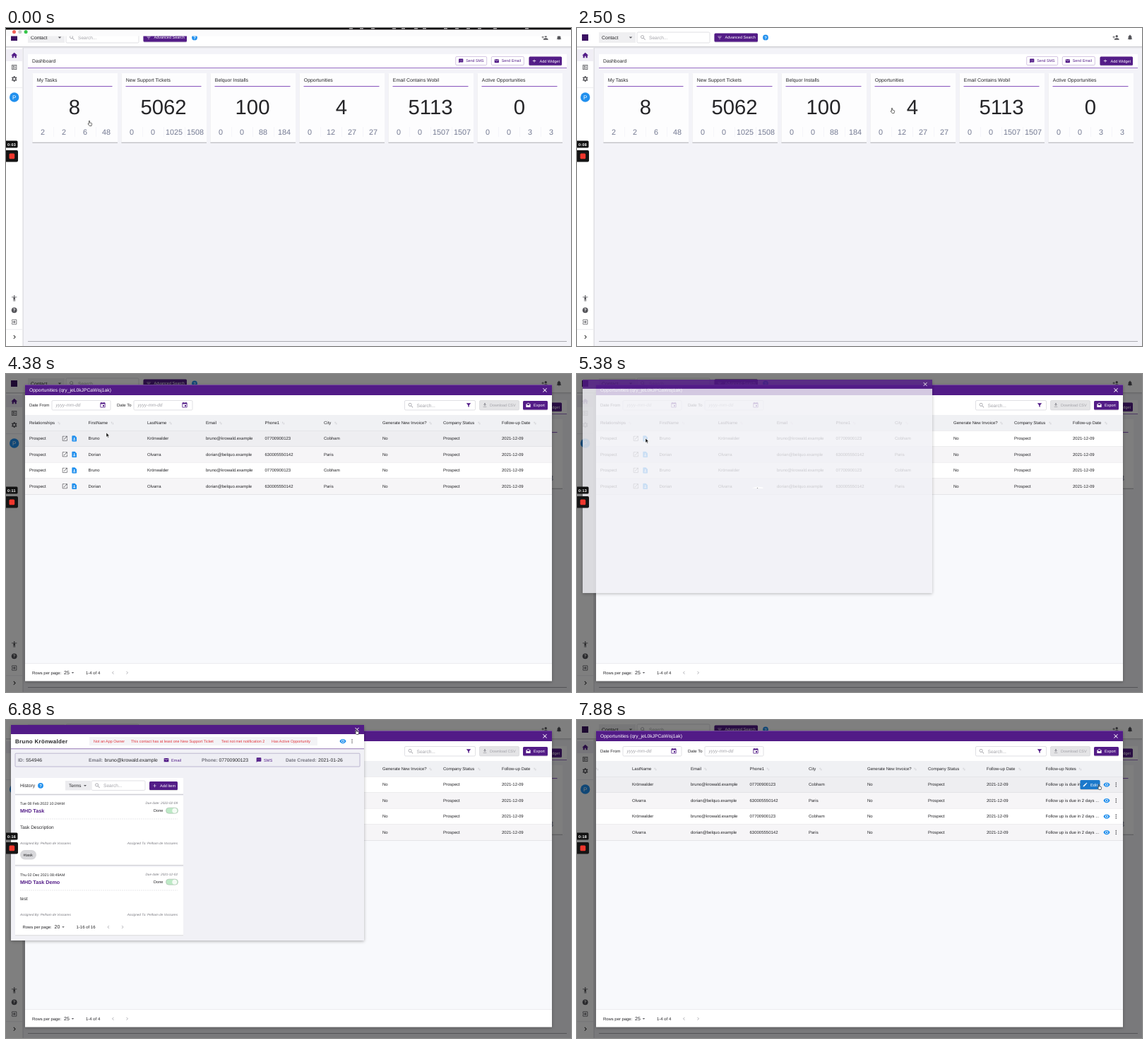
An HTML page for the animation above (8 s loop, 800x450 px).

```html
<!DOCTYPE html>
<html lang="en">
<head>
<meta charset="utf-8">
<title>Dashboard walkthrough</title>
<style>
html, body { margin: 0; width: 100%; height: 100%; overflow: hidden; background: #f3f3f7; }
svg { display: block; width: 100%; height: 100%; }
text { font-family: "Liberation Sans", Arial, sans-serif; text-rendering: geometricPrecision; white-space: pre; }
</style>
</head>
<body>
<svg id="stage" viewBox="0 0 800 450"></svg>
<script>
const LOOP = 8000, STEP = 125;
const PURPLE = '#521b87', BLUE = '#2190ee', INK = '#252528', GREY = '#a2a2a8', LINE = '#d3d3d8';

const ICONS = {
  home: 'M10 20v-6h4v6h5v-8h3L12 3 2 12h3v8z',
  list: 'M3 3h18v18H3zM5 5v14h14V5zM7 7h5v5H7zm7 0h3v2h-3zm0 4h3v2h-3zm-7 3h5v3H7zm7 1h3v2h-3z',
  gear: 'M10 2h4l.5 3 2 1 3-1 2 3.5-2.5 2v3l2.5 2-2 3.5-3-1-2 1-.5 3h-4l-.5-3-2-1-3 1-2-3.5 2.5-2v-3l-2.5-2 2-3.5 3 1 2-1zM12 8a4 4 0 1 0 0 8 4 4 0 0 0 0-8z',
  person: 'M12 2a2 2 0 1 1 0 4 2 2 0 0 1 0-4zm9 7h-6v13h-2v-6h-2v6H9V9H3V7h18z',
  exit: 'M10.1 15.6L11.5 17l5-5-5-5-1.4 1.4 2.6 2.6H3v2h9.7zM19 3H5a2 2 0 0 0-2 2v4h2V5h14v14H5v-4H3v4a2 2 0 0 0 2 2h14a2 2 0 0 0 2-2V5a2 2 0 0 0-2-2z',
  next: 'M8.6 16.6L13.2 12 8.6 7.4 10 6l6 6-6 6z',
  prev: 'M15.4 7.4L10.8 12l4.6 4.6L14 18l-6-6 6-6z',
  drop: 'M6 9l6 6 6-6z',
  search: 'M9.5 3a6.5 6.5 0 0 1 5.2 10.4L21 19.5 19.5 21l-6.1-6.3A6.5 6.5 0 1 1 9.5 3zm0 2a4.5 4.5 0 1 0 0 9 4.5 4.5 0 0 0 0-9z',
  lines: 'M10 18h4v-2h-4zM3 6v2h18V6zm3 7h12v-2H6z',
  funnel: 'M3 4h18l-7 9v7l-4-2v-5z',
  addPerson: 'M15 4a4 4 0 1 1 0 8 4 4 0 0 1 0-8zM6 10V7H4v3H1v2h3v3h2v-3h3v-2zm9 4c-2.7 0-8 1.3-8 4v2h16v-2c0-2.7-5.3-4-8-4z',
  bell: 'M10 20h4a2 2 0 0 1-4 0zm8-4v-5c0-3-1.6-5.6-4.5-6.3V4a1.5 1.5 0 0 0-3 0v.7C7.6 5.4 6 8 6 11v5l-2 2v1h16v-1z',
  sms: 'M4 2h16a2 2 0 0 1 2 2v12a2 2 0 0 1-2 2H6l-4 4V4a2 2 0 0 1 2-2zm3 7v2h2V9zm4 0v2h2V9zm4 0v2h2V9z',
  mail: 'M4 4h16a2 2 0 0 1 2 2v12a2 2 0 0 1-2 2H4a2 2 0 0 1-2-2V6a2 2 0 0 1 2-2zm16 4V6l-8 5-8-5v2l8 5z',
  draft: 'M12 1l10 6v12a2 2 0 0 1-2 2H4a2 2 0 0 1-2-2V7zM4 8l8 5 8-5-8-5z',
  plus: 'M11 5h2v6h6v2h-6v6h-2v-6H5v-2h6z',
  close: 'M19 6.4L17.6 5 12 10.6 6.4 5 5 6.4 10.6 12 5 17.6 6.4 19 12 13.4 17.6 19 19 17.6 13.4 12z',
  calendar: 'M17 12h-5v5h5zM16 1v2H8V1H6v2H5a2 2 0 0 0-2 2v14a2 2 0 0 0 2 2h14a2 2 0 0 0 2-2V5a2 2 0 0 0-2-2h-1V1zm3 18H5V8h14z',
  download: 'M19 9h-4V3H9v6H5l7 7zM5 18v2h14v-2z',
  open: 'M19 19H5V5h7V3H5a2 2 0 0 0-2 2v14a2 2 0 0 0 2 2h14a2 2 0 0 0 2-2v-7h-2zM14 3v2h3.6l-9.8 9.8 1.4 1.4L19 6.4V10h2V3z',
  card: 'M14 2H6a2 2 0 0 0-2 2v16a2 2 0 0 0 2 2h12a2 2 0 0 0 2-2V8zM12 9a2.2 2.2 0 1 1 0 4.4A2.2 2.2 0 0 1 12 9zm4 9H8c0-2 2-3 4-3s4 1 4 3z',
  eye: 'M12 4.5C7 4.5 2.7 7.6 1 12c1.7 4.4 6 7.5 11 7.5s9.3-3.1 11-7.5c-1.7-4.4-6-7.5-11-7.5zM12 7a5 5 0 1 1 0 10 5 5 0 0 1 0-10zm0 2a3 3 0 1 0 0 6 3 3 0 0 0 0-6z',
  dots: 'M12 4a2 2 0 1 1 0 4 2 2 0 0 1 0-4zm0 6a2 2 0 1 1 0 4 2 2 0 0 1 0-4zm0 6a2 2 0 1 1 0 4 2 2 0 0 1 0-4z',
  pencil: 'M3 17.2V21h3.8L17.8 9.9l-3.7-3.7zM20.7 7a1 1 0 0 0 0-1.4l-2.3-2.3a1 1 0 0 0-1.4 0l-1.9 1.8 3.8 3.8z',
  sort: 'M8 3l4 5H9v8H7V8H4zM16 21l-4-5h3V8h2v8h3z'
};

const text = (x, y, s, size = 6, fill = INK, more = '') =>
  `<text x="${x}" y="${y}" font-size="${size}" fill="${fill}" ${more}>${s}</text>`;
const box = (x, y, w, h, fill, more = '') =>
  `<rect x="${x}" y="${y}" width="${w}" height="${h}" fill="${fill}" ${more}/>`;
const icon = (name, cx, cy, size, fill = '#55555a') =>
  `<path fill="${fill}" fill-rule="evenodd" transform="translate(${cx - size / 2} ${cy - size / 2}) scale(${size / 24})" d="${ICONS[name]}"/>`;
const field = (x, y, w, h, stroke = LINE) => box(x, y, w, h, '#fff', `rx="1.5" stroke="${stroke}" stroke-width=".7"`);
const group = (id, body, more = '') => `<g id="${id}" ${more}>${body}</g>`;
const help = (x, y, fill = BLUE) => `<circle cx="${x}" cy="${y}" r="3.9" fill="${fill}"/>` +
  text(x, y + 2.1, '?', 6, '#fff', 'text-anchor="middle" font-weight="bold"');
const button = (x, y, w, h, name, label) => box(x, y, w, h, PURPLE, 'rx="1.5" filter="url(#soft)"') +
  icon(name, x + 7.5, y + h / 2, 7.5, '#fff') + text(x + 15, y + h / 2 + 1.9, label, 5.5, '#fff');
const outlined = (x, w, name, label) => field(x, 40.5, w, 12, '#c3aed8') +
  icon(name, x + 7.5, 46.7, 7.5, PURPLE) + text(x + 14.5, 48.4, label, 5.3, PURPLE);
const searchBox = (x, y, w, h) => field(x, y, w, h) + icon('search', x + 8.5, y + h / 2, 9, GREY) +
  text(x + 17, y + h / 2 + 2.3, 'Search...', 6.6, GREY);
const pager = (x, y, size, range, arrows) => text(x, y, 'Rows per page:', 5.9) + text(x + 45, y + .4, size, 7) +
  icon('drop', x + 57.5, y - 2, 7) + range +
  icon('prev', arrows, y - 2, 9, '#b5b5ba') + icon('next', arrows + 20, y - 2, 9, '#b5b5ba');

function page() {
  const cards = [
    ['My Tasks', 8, [2, 2, 6, 48]], ['New Support Tickets', 5062, [0, 0, 1025, 1508]],
    ['Belquor Installs', 100, [0, 0, 88, 184]], ['Opportunities', 4, [0, 12, 27, 27]],
    ['Email Contains Wobil', 5113, [0, 0, 1507, 1507]], ['Active Opportunities', 0, [0, 0, 3, 3]]
  ].map(([title, total, parts], i) => {
    const x = 37.5 + i * 126;
    return box(x, 64, 120.5, 98, '#fdfdfe', 'filter="url(#soft)"') + box(x, 161.7, 120.5, .8, '#b3b3ba') +
      text(x + 6.3, 76.2, title, 6.9) + box(x + 6, 82, 107, 1.1, '#8d5cbf') +
      text(x + 59.5, 121.6, total, 29.3, INK, 'text-anchor="middle"') +
      parts.map((n, k) => text(x + 14.5 + k * 30, 151, n, 10.8, '#727891', 'text-anchor="middle"') +
        (k ? box(x + k * 30 - .5, 140, .6, 14, '#f1f1f5') : '')).join('');
  }).join('');
  const header = box(0, 0, 800, 26, '#fff') + box(0, 26, 800, 1, '#cfcfd3') + box(0, 27, 800, 1.5, '#e3e3e7') +
    box(7, 9, 9, 9, '#3b1263') +
    box(31, 6, 52, 15, '#efeff1') + text(35, 15.9, 'Contact', 6.8) + icon('drop', 76, 13.5, 9) +
    searchBox(85, 6, 103, 15) + button(194.5, 7.5, 61.5, 12, 'lines', 'Advanced Search') + help(267, 13.4) +
    icon('addPerson', 763, 13.3, 10) + icon('bell', 783, 13.3, 9.5);
  const side = box(0, 28, 24, 422, '#fff') + box(23.5, 28, 1.2, 422, '#d9d9de') + box(0, 30, 23, 17, '#f0eef5') +
    icon('home', 11.7, 38.8, 10.5, PURPLE) + icon('list', 11.7, 55.5, 9.5) + icon('gear', 11.7, 72, 9.5) +
    box(0, 84, 23, .6, '#e0e0e4') + `<circle cx="11.7" cy="98" r="6.7" fill="${BLUE}"/>` +
    text(11.7, 100.8, 'P', 8, '#fff', 'text-anchor="middle"') +
    icon('person', 11.7, 382.5, 10) + help(11.7, 399.3, '#55555a') + icon('exit', 11.7, 416, 9.5) +
    box(0, 426.5, 23, .6, '#e0e0e4') + icon('next', 12, 437.3, 11, '#222');
  const bar = box(31, 37, 763, 19, '#fff') + box(31, 56, 763, 1, '#9a70c6') + text(37, 48.7, 'Dashboard', 6.8) +
    outlined(636.7, 44, 'sms', 'Send SMS') + outlined(687.3, 46, 'mail', 'Send Email') +
    button(740.5, 40.5, 46.5, 12.3, 'plus', 'Add Widget');
  return box(0, 0, 800, 450, '#f3f3f8') + header + side + bar + cards + box(31, 443, 763, 1, '#aaaab0');
}

const PEOPLE = [
  ['Bruno', 'Krönwalder', 'bruno@krowald.example', '07700900123', 'Cobham'],
  ['Dorian', 'Olvarra', 'dorian@belquo.example', '630005550142', 'Paris']
];
const COLUMNS = [33, 116.5, 200, 283, 366.5, 450, 533, 619, 702, 785.5];
const HEADS = ['Relationships', 'FirstName', 'LastName', 'Email', 'Phone1', 'City',
  'Generate New Invoice?', 'Company Status', 'Follow-up Date', 'Follow-up Notes'];
const HEAD_WIDTHS = [36, 28, 27, 15, 20, 11, 62, 45, 41, 43];

function table() {
  let rows = '', cells = '';
  for (let r = 0; r < 4; r++) {
    const y = 80.5 + r * 22.5, mid = y + 11;
    rows += box(27, y, 746, 22.5, r % 2 ? '#f6f5f7' : '#fff', r ? '' : 'id="firstRow"') + box(27, y + 22, 746, .6, '#d9d9de');
    const values = ['Prospect', ...PEOPLE[r % 2], 'No', 'Prospect', '2021-12-09', 'Follow up is due in 2 days ...'];
    cells += values.map((v, c) => text(COLUMNS[c], mid + 1.7, v, 6)).join('') +
      icon('open', 83.3, mid - .2, 9.5, '#68686d') + icon('card', 96.7, mid - .2, 10, BLUE) +
      icon('eye', 872, mid, 10, BLUE) + icon('dots', 885.3, mid, 9.5);
  }
  const heads = HEADS.map((h, c) => text(COLUMNS[c], 71.4, h, 6) +
    icon('sort', COLUMNS[c] + HEAD_WIDTHS[c] + 6, 69.5, 5.5, '#c3c3c9')).join('');
  const edit = group('edit', box(834.5, 85, 28, 13, '#1b79cb', 'rx="1.5" filter="url(#soft)"') +
    icon('pencil', 841.5, 91.5, 7.5, '#fff') + text(849, 93.5, 'Edit', 5.8, '#fff'));
  return group('table', rows + group('cells', heads + cells + edit));
}

function modal() {
  const date = (x, label, inputX) => text(x, 45.9, label, 6) + field(inputX, 37.5, 83, 13.5) +
    text(inputX + 5.5, 46.2, 'yyyy-mm-dd', 6.4, GREY, 'font-style="italic"') +
    icon('calendar', inputX + 72, 44, 9.5, PURPLE);
  return box(27, 15.3, 746, 419, '#f8f9fc', 'filter="url(#deep)"') + box(27, 15.3, 746, 14.7, PURPLE) +
    text(33, 25.1, 'Opportunities (qry_jeL0kJPCaWisj1ak)', 6.75, '#fff') + icon('close', 763, 22.8, 10, '#fff') +
    box(27, 30, 746, 28, '#fff') + date(33, 'Date From', 65) + date(157, 'Date To', 181) +
    searchBox(564.5, 37.5, 100, 13.5) + icon('funnel', 655, 44, 8.5, PURPLE) +
    box(670.5, 37.5, 56, 13.5, '#e4e4e6', 'rx="1.5" stroke="#d2d2d5" stroke-width=".6"') +
    icon('download', 678, 44, 8, GREY) + text(685, 46, 'Download CSV', 5.4, GREY) +
    button(732, 38, 35, 12.5, 'draft', 'Export') +
    box(27, 58, 746, 22.5, '#f0f1f4') + box(27, 80.3, 746, .7, '#d5d5da') +
    `<g clip-path="url(#body)">${table()}</g>` +
    group('loader', '<circle cx="401.5" cy="74" r="10" fill="#fff"/><circle cx="402.5" cy="78" r=".7" fill="#777"/>', 'clip-path="url(#head)"') +
    box(27, 409.5, 746, 24.8, '#fff') + box(27, 409.5, 746, .6, '#e0e0e4') +
    pager(37, 424.8, '25', '<text id="range" x="113" y="424.8" font-size="6" fill="#252528"/>', 151.5);
}

function task(y, when, due, title, body) {
  const small = (x, dy, s, anchor) => text(x, y + dy, s, 4.7, '#77777e', `font-style="italic" text-anchor="${anchor}"`);
  return box(13, y, 238, 98, '#fff', 'filter="url(#soft)"') + text(20, y + 13.3, when, 5.3) + small(243, 12, `Due date: ${due}`, 'end') +
    text(20, y + 23.6, title, 7.2, PURPLE, 'font-weight="bold"') + text(209, y + 23, 'Done', 5.6) +
    box(226.5, y + 17.2, 17, 8, '#bdeac6', 'rx="4" stroke="#a9b5ac" stroke-width=".6"') + `<circle cx="238.8" cy="${y + 21.2}" r="3.5" fill="#f4fbf5"/>` +
    `<path d="M20 ${y + 33}H243" stroke="#d9d9de" stroke-width=".6" stroke-dasharray="2 1"/>` + text(20, y + 47, body, 6.5) +
    small(20, 68.5, 'Assigned By: Pelham de Vossares', 'start') + small(243, 68.5, 'Assigned To: Pelham de Vossares', 'end');
}

function contact() {
  const [first, last, mail, phone] = PEOPLE[0];
  const pair = (x, label, vx, value) => text(x, 59, label, 6.7, '#74747f', 'font-weight="bold"') + text(vx, 59, value, 6.8);
  const tags = [[124, 'Not an App Owner'], [177, 'This contact has at least one New Support Ticket'],
    [305, 'Test not met notification 2'], [376, 'Has Active Opportunity']];
  return box(7, 20, 500, 20.5, '#fff') + box(7, 40.3, 500, .9, '#8d6bb0') +
    text(13, 32.9, `${first} ${last}`, 7.9, INK, 'font-weight="bold" letter-spacing=".35"') +
    box(118, 24, 323, 12, '#f3f3f6') + tags.map(([x, s]) => text(x, 31.9, s, 5.4, '#e2353c')).join('') +
    icon('eye', 477, 30, 10, BLUE) + icon('dots', 490, 30, 9) +
    box(13, 47.2, 488, 18.8, '#eeeef4', 'rx="1" stroke="#a79fc0" stroke-width=".7"') +
    pair(17, 'ID:', 28.3, '554946') + pair(117, 'Email:', 139.5, mail) + icon('mail', 227, 56.7, 8, PURPLE) + text(234, 58.6, 'Email', 5.6, PURPLE) +
    pair(277, 'Phone:', 301.5, phone) + icon('sms', 358, 56.7, 8, PURPLE) + text(365, 58.6, 'SMS', 5.6, PURPLE) +
    pair(396, 'Date Created:', 442, '2021-01-26') +
    box(13, 82, 238, 23, '#fff') + box(13, 104.8, 238, .8, '#b9b9c1') + text(20, 95, 'History', 6.8) + help(49, 92.8) +
    box(84, 86, 36, 13.5, '#ececef') + text(89, 95, 'Terms', 6.4) + icon('drop', 112, 93, 8) +
    searchBox(121, 86, 76, 13.5) + button(203, 87, 40, 12, 'plus', 'Add Item') +
    task(107, 'Tue 08 Feb 2022 10:24AM', '2022-02-09', 'MHD Task', 'Task Description') +
    box(20, 184, 23, 13.5, '#d8d8db', 'rx="6.7"') + text(24.5, 192.7, '#task', 5.6) +
    task(208, 'Thu 02 Dec 2021 08:49AM', '2021-12-02', 'MHD Task Demo', 'test') +
    box(13, 281, 238, 24, '#fff') + box(13, 304.5, 238, .8, '#c3c3ca') + box(7, 306, 500, 6, '#f1f1f6') +
    pager(23.5, 295, '20', text(99.5, 295, '1-16 of 16', 6), 145);
}

const popup = () => box(7, 7, 500, 305, '#f1f1f6', 'filter="url(#deep)"') + box(7, 7, 500, 13, PURPLE) +
  icon('close', 497, 13.5, 9.5, '#fff') + group('contact', contact()) +
  group('popupLoader', '<path d="M249 162q8-3 16-1v1.5z" fill="#fff"/><circle cx="257" cy="162" r=".7" fill="#888"/>');

const recorder = () => box(-3, 159.5, 19.5, 10, '#111', 'rx="1.5"') +
  '<text id="clock" x="8" y="166.5" font-size="5.5" fill="#fff" font-weight="bold" text-anchor="middle" letter-spacing=".3"/>' +
  box(-3, 173, 20, 16.5, '#151515', 'rx="2"') + box(4.5, 177.5, 7.7, 7.7, '#f0372d', 'rx="1.5"');

const menuBar = () => box(0, 0, 800, 11.5, '#fbfbfc') + box(0, 0, 800, 2.3, '#0b0509') +
  ['#f25f57', '#c8cacb', '#35c649'].map((c, i) => `<circle cx="${11.5 + i * 8.3}" cy="5.5" r="2.5" fill="${c}"/>`).join('') +
  [486, 501, 517, 547, 560, 578, 590, 620, 636, 652, 668, 690, 735].map(x => box(x, 0, 5, 1.3, '#bbb')).join('');

const cursors = () =>
  group('arrow', '<path d="M0 0v6.2l1.5-1.3 1 2.3 1-.4-1-2.2h2z" fill="#111" stroke="#fff" stroke-width=".5"/>') +
  group('hand', '<path d="M-.6-2.5q.6-.9 1.2 0V0l2.6.6q.6.3.4 1.2L3 4.5H.2L-2 1.7q.2-.9 1.4 0z" fill="#fff" stroke="#222" stroke-width=".65"/>');

const stage = document.getElementById('stage');
stage.innerHTML = `<defs>
  <filter id="soft" x="-10%" y="-15%" width="120%" height="140%"><feDropShadow dx="0" dy=".6" stdDeviation=".7" flood-opacity=".25"/></filter>
  <filter id="deep" x="-5%" y="-5%" width="110%" height="112%"><feDropShadow dx="0" dy="1.3" stdDeviation="2" flood-opacity=".3"/></filter>
  <clipPath id="body"><rect x="27" y="58" width="746" height="351"/></clipPath>
  <clipPath id="head"><rect x="27" y="58" width="746" height="23"/></clipPath></defs>` +
  page() + group('menu', menuBar()) + group('modal', box(0, 0, 800, 450, '#000', 'opacity=".5"') + modal()) +
  group('popup', popup()) + recorder() + group('cursor', cursors());

const el = {};
stage.querySelectorAll('[id]').forEach(node => el[node.id] = node);

const PATH = [[0, 118, 134], [375, 118, 136], [1000, 121, 179], [1875, 121, 179], [2625, 472, 111], [3375, 472, 111],
  [4375, 142, 83], [4750, 97, 91], [6250, 97, 91], [6875, 496, 16], [7125, 496, 16], [7500, 600, 130], [7875, 739, 94]];

const ramp = (t, from, to) => Math.max(0, Math.min(1, (t - from) / (to - from)));
const ease = u => u * u * (3 - 2 * u);
const show = (node, on) => node.setAttribute('visibility', on ? 'inherit' : 'hidden');
const within = (t, ...spans) => spans.some(([a, b]) => t >= a && t < b);

function cursorAt(t) {
  const i = PATH.findIndex(p => p[0] > t);
  if (i < 0) return PATH[PATH.length - 1].slice(1);
  const [t0, x0, y0] = PATH[i - 1], [t1, x1, y1] = PATH[i], u = ease(ramp(t, t0, t1));
  return [x0 + (x1 - x0) * u, y0 + (y1 - y0) * u];
}

function render(time) {
  const t = Math.floor((time + 2) / STEP) * STEP;
  el.menu.setAttribute('transform', `translate(0 ${-12 * ease(ramp(t, 125, 500))})`);

  const fade = ramp(t, 2875, 3125), loaded = t >= 3375;
  show(el.modal, fade > 0);
  el.modal.setAttribute('opacity', fade);
  show(el.table, loaded);
  show(el.loader, !loaded);
  el.range.textContent = loaded ? '1-4 of 4' : '0-0 of 0';
  el.cells.setAttribute('transform', `translate(${-122 * ease(ramp(t, 7250, 7625))} 0)`);
  show(el.edit, t >= 7750);

  const grow = ramp(t, 5250, 5500), leave = ramp(t, 7000, 7250), scale = .98 + .02 * grow, offset = 9 - 2 * grow;
  show(el.popup, t >= 5250 && leave < 1);
  el.popup.setAttribute('opacity', (.62 + .38 * grow) * (1 - leave));
  el.popup.setAttribute('transform', `translate(${offset} ${offset}) scale(${scale}) translate(-7 -7)`);
  show(el.contact, t >= 5875);
  show(el.popupLoader, t < 5875);

  const [x, y] = cursorAt(t);
  const pointing = within(t, [0, 375], [2500, 3000], [4625, 5250], [6750, 7250], [7750, LOOP]);
  el.cursor.setAttribute('transform', `translate(${x} ${y})`);
  show(el.hand, pointing);
  show(el.arrow, !pointing);
  const hovering = y > 80 && y < 103 && !within(t, [5250, 7250]);
  el.firstRow.setAttribute('fill', hovering ? '#eeeef1' : '#fff');
  el.clock.textContent = '0:' + String(Math.floor(3 + t / 500)).padStart(2, '0');
}

const start = performance.now();
function tick() {
  render((performance.now() - start) % LOOP);
  requestAnimationFrame(tick);
}
tick();
</script>
</body>
</html>
```
